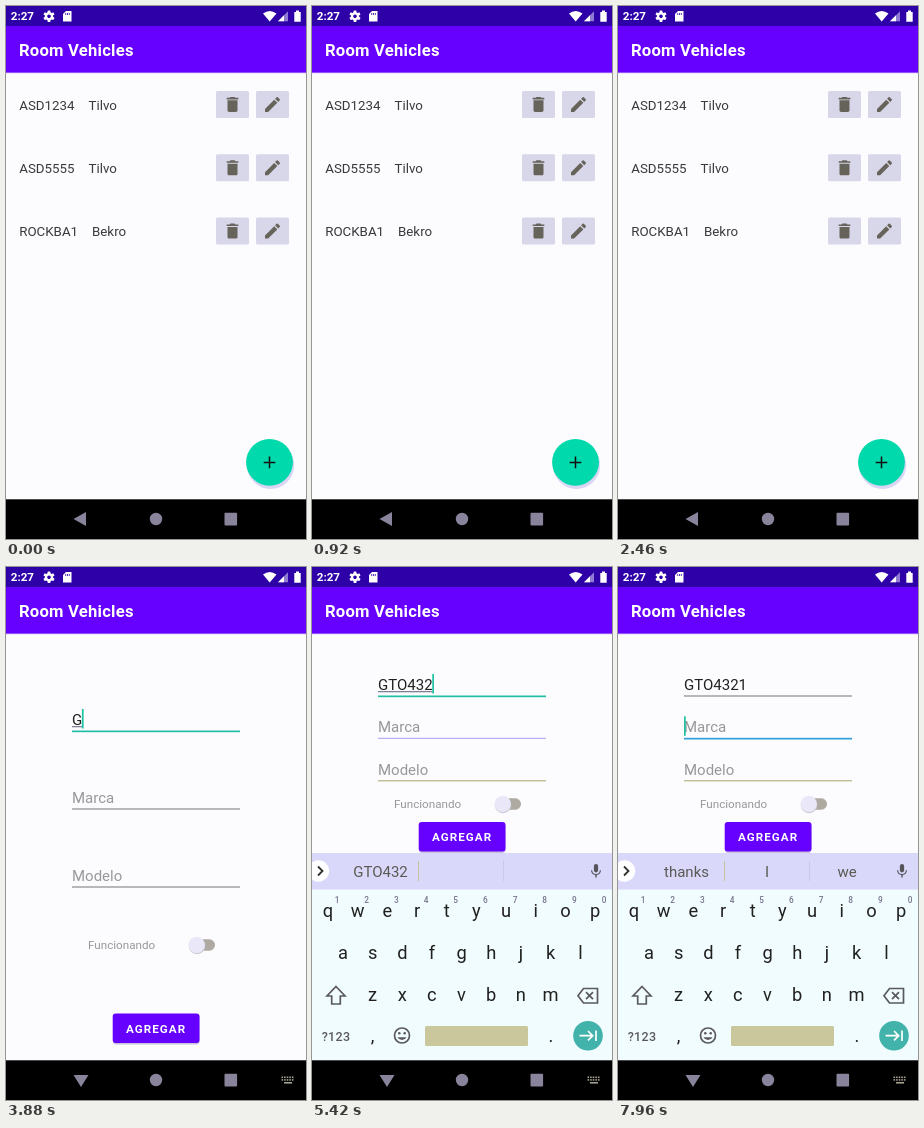
An HTML page for the animation above (8000 ms loop, 300x533 px).

```html
<!DOCTYPE html>
<html lang="es">
<head>
<meta charset="utf-8">
<title>Room Vehicles</title>
<style>
  html, body { margin: 0; width: 100%; height: 100%; overflow: hidden; background: #fcfcff; }
  svg { display: block; width: 100%; height: 100%; }
  text { font-family: Roboto, "Noto Sans", sans-serif; fill: #20201f; white-space: pre; }
  .mid { text-anchor: middle; }
  .row { font-size: 13.33px; fill: #3a3a3a; }
  .field { font-size: 15px; }
  .hint { fill: #98979a; }
  .key { font-size: 18.3px; }
  .word { font-size: 15px; fill: #5a5952; }
  .med { font-weight: 500; }
  .bold { font-weight: 700; fill: #fff; }
  .line { fill: none; stroke: #5a5a5e; stroke-width: 1.7; }
</style>
</head>
<body>
<svg id="stage" viewBox="0 0 300 533"></svg>
<script>
const LOOP = 8000;
const FORM_AT = 3300, FOCUS_AT = 3660, IME_AT = 3740, KEYS_AT = 3900, TAB_AT = 5940;
const typed = [[3840, "G"], [4000, "GT"], [4150, "GTO"], [4750, "GTO4"],
               [5000, "GTO43"], [5220, "GTO432"], [5450, "GTO4321"]];
const words = {
  "": ["thanks", "I", "we"],
  G: ["G", "Good", "Go"],
  GT: ["GT", "GTA", "GET"],
  GTO: ["GTO", "GO", "GOOD"]
};
// Baselines of the fields, centre of the switch, top of the button
const tall = { fields: [158, 236, 314], toggle: 378, button: 446.5 };
const compact = { fields: [123, 165.3, 207.8], toggle: 237, button: 255 };

const rect = (x, y, w, h, fill, extra = "") =>
  `<rect x="${x}" y="${y}" width="${w}" height="${h}" fill="${fill}" ${extra}/>`;
const circle = (x, y, r, fill, extra = "") =>
  `<circle cx="${x}" cy="${y}" r="${r}" fill="${fill}" ${extra}/>`;
const text = (x, y, cls, str, extra = "") =>
  `<text x="${x}" y="${y}" class="${cls}" ${extra}>${str}</text>`;
const path = (d, fill, extra = "") => `<path d="${d}" fill="${fill}" ${extra}/>`;
const group = (id, body, extra = "") => `<g id="${id}" ${extra}>${body}</g>`;
// Icon drawn on a 24 unit grid, centred on x, y
const icon = (x, y, size, d, fill) =>
  path(d, fill, `transform="translate(${x - size / 2} ${y - size / 2}) scale(${size / 24})"`);

const TRASH = "M6 19c0 1.1.9 2 2 2h8c1.1 0 2-.9 2-2V7H6zM19 4h-3.500l-1-1h-5l-1 1H5v2h14z";
const PENCIL = "M3 17.250V21h3.750L17.800 9.940l-3.750-3.750zM20.700 7.040a1 1 0 0 0 0-1.410l-2.340-2.340a1 1 0 0 0-1.410 0l-1.830 1.830 3.750 3.750z";
const MIC = "M12 14a3 3 0 0 0 3-3V5a3 3 0 0 0-6 0v6a3 3 0 0 0 3 3zM17.300 11a5.300 5.300 0 0 1-10.600 0H5a7 7 0 0 0 6 6.700V21h2v-3.300A7 7 0 0 0 19 11z";

function gear(x, y) {
  let teeth = "";
  for (let a = 0; a < 360; a += 60)
    teeth += rect(-1.4, -5.7, 2.8, 3.5, "#fff", `rx=".5" transform="rotate(${a})"`);
  return `<g transform="translate(${x} ${y})">${teeth}
    <circle r="3" fill="none" stroke="#fff" stroke-width="2.400"/></g>`;
}

function bars() {
  return rect(0, 0, 300, 20, "#2e00a8") +
    text(4.7, 14.4, "bold", "2:27", 'style="font-size:11.67px"') +
    gear(43, 10.2) +
    path("M60 5h5.500v10.500h-8.500V8z", "#fff") +
    path("M59.700 7v2M61.500 7v2M63.300 7v2", "none", 'stroke="#2e00a8" stroke-width=".8"') +
    path("M257 7.500Q263.700 2.500 270.500 7.500L263.700 15.500Z", "#fff") +
    path("M272 15.200L282 5.200V15.200Z", "#8f7bd4") +
    path("M272 15.200L278 9.200V15.200Z", "#fff") +
    path("M288.300 6h1.700v-1.400h3v1.400h1.700v9.700h-6.400z", "#fff") +
    rect(0, 20, 300, 46.65, "#6600ff") +
    text(13, 49.7, "bold", "Room Vehicles", 'style="font-size:16.67px;letter-spacing:.0125em"');
}

function list() {
  const rows = [["ASD1234", "Tilvo", 82.5], ["ASD5555", "Tilvo", 82.5], ["ROCKBA1", "Bekro", 86]];
  const body = rows.map(([plate, model, x], i) => {
    const y = 98.5 + i * 63.3;
    return text(13.2, y + 5, "row", plate) + text(x, y + 5, "row", model) +
      [226.5, 266.5].map((cx, k) =>
        rect(cx - 16.5, y - 13.5, 33, 27, "#d8d6e9", 'rx="1.500"') +
        icon(cx, y, 20, k ? PENCIL : TRASH, "#66645a")).join("");
  }).join("");
  return body + group("fab",
    circle(264.5, 459.3, 23.7, "#d8d6f4") + circle(263.5, 456.3, 23.4, "#00d9ab") +
    circle(263.5, 456.3, 0, "#fff", 'id="ripple"') +
    path("M257.700 456.400h11.600M263.500 450.600v11.600", "none", 'stroke="#101010" stroke-width="1.500"'));
}

function form() {
  const hints = ["Placas", "Marca", "Modelo"];
  return rect(0, 67, 300, 426, "#fcfcff") +
    hints.map((h, i) => group("field" + i,
      text(66, 0, "field hint", h) + rect(66, 5.5, 168, 1, "#77777b"))).join("") +
    rect(66, 0, 0, 0.9, "#4c4a70", 'id="compose"') +
    rect(66, 0, 1.7, 19.5, "#1cc3a2", 'id="caret"') +
    group("toggle", text(82, 4.4, "hint", "Funcionando", 'style="font-size:11.67px"') +
      rect(184, -5.7, 25, 11.4, "#aeaaa2", 'rx="5.700"') +
      circle(191, 1, 8.3, "#c9c7cf") + circle(190.7, 0, 8.2, "#eae8f8")) +
    group("button", rect(107, 1.4, 86.5, 29.6, "#c6c1dc", 'rx="3"') +
      rect(106.7, 0, 86.8, 29.6, "#6600ff", 'rx="3"') +
      text(120, 19, "bold", "AGREGAR", 'style="font-size:11.67px;letter-spacing:1.04px"'));
}

function keyboard() {
  const row = (keys, x, y) => [...keys].map((k, i) =>
    text(x + i * 29.67, y, "key mid", k)).join("");
  const digits = [..."1234567890"].map((d, i) =>
    text(25 + i * 29.67, 336, "mid med", d, 'style="font-size:8.3px;fill:#77758c"')).join("");
  return rect(0, 286, 300, 37, "#d9d8fb") + rect(0, 322.5, 300, 171, "#f1fcff") +
    circle(6.5, 304, 10.7, "#fff") +
    path("M6 299.500l4.500 4.500-4.500 4.500", "none", 'stroke="#30302e" stroke-width="1.800"') +
    [68.5, 149, 229].map((x, i) => text(x, 309.5, "word mid", "", `id="word${i}"`)).join("") +
    rect(106, 294, 1, 20, "#c6c49c") + rect(191, 294, 1, 20, "#cac8e6") +
    icon(284, 304, 17, MIC, "#55545a") +
    row("qwertyuiop", 16, 349.5) + digits + row("asdfghjkl", 31, 391.5) + row("zxcvbnm", 60.5, 434) +
    path("M24 419.500l9 9.500h-4.700v8h-8.600v-8H15z", "none", 'class="line"') +
    path("M271.500 421.500h14v14.500h-14l-5.500-7.250z", "none", 'class="line"') +
    path("M274 425.200l7 7m0-7l-7 7", "none", 'class="line"') +
    text(24, 473.5, "mid med", "?123", 'style="font-size:12.5px;fill:#5a5a5e;letter-spacing:.3px"') +
    text(60.5, 474.5, "key mid", ",") + text(239, 474.5, "key mid", ".") +
    circle(90, 468.5, 7.5, "none", 'class="line"') +
    circle(87.3, 466.3, 1.3, "#5a5a5e") + circle(92.7, 466.3, 1.3, "#5a5a5e") +
    path("M85.500 470.200a5 5 0 0 0 9 0z", "#5a5a5e") +
    rect(113, 459, 103, 20, "#c9c79b", 'rx="1.500"') +
    circle(276, 468.7, 14.8, "#42b3aa") +
    path("M267.500 468.700h13M276 464l4.700 4.700-4.700 4.700M284 463.500v10.400", "none", 'stroke="#fff" stroke-width="1.700"');
}

function nav() {
  const c = "#89849c";
  let dots = "";
  for (let i = 0; i < 10; i++)
    dots += rect(275.5 + (i % 5) * 2.6, 509.5 + Math.floor(i / 5) * 2.6, 1.6, 1.6, "#a3a08f");
  return rect(0, 493.3, 300, 40, "#000") +
    path("M67.500 513L80 506v14z", c, 'id="back"') +
    path("M67.500 508h15l-7.500 12z", c, 'id="down"') +
    circle(150, 513, 6.2, c) + rect(218.5, 506.8, 12.6, 12.6, c, 'rx="1"') +
    group("ime", dots + rect(278, 515, 8, 1.6, "#a3a08f"));
}

const stage = document.getElementById("stage");
stage.innerHTML = rect(0, 0, 300, 533, "#fcfcff") + group("list", list()) + group("form", form()) +
  rect(0, 66.5, 300, 1, "#dcd8f2") + bars() + group("keys", keyboard()) + nav() +
  text(66, 0, "field", "", 'id="probe" visibility="hidden"');

const el = {};
stage.querySelectorAll("[id]").forEach(n => el[n.id] = n);
const set = (n, attrs) => { for (const k in attrs) n.setAttribute(k, attrs[k]); };
const show = (n, on) => set(n, { visibility: on ? "visible" : "hidden" });
const move = (n, y) => set(n, { transform: `translate(0 ${y})` });
const ramp = (t, from, ms) => Math.min(1, Math.max(0, (t - from) / ms));
const easeOut = p => 1 - (1 - p) ** 3;

function lineColor(i, active, keysUp) {
  if (i === active) return i ? "#2f9fdc" : "#22bfa3";
  if (!keysUp || !i) return "#77777b";
  return i === 1 ? "#a79eee" : "#a9a568";
}

function render(t) {
  const press = ramp(t, 3170, 180);
  set(el.ripple, { r: 23.3 * easeOut(press), opacity: press > 0 ? 0.28 : 0 });

  const enter = easeOut(ramp(t, FORM_AT, 220));
  set(el.form, { opacity: enter });
  move(el.form, 34 * (1 - enter));

  const keysUp = t >= KEYS_AT;
  const layout = keysUp ? compact : tall;
  const active = t < FOCUS_AT ? -1 : t < TAB_AT ? 0 : 1;
  const last = typed.filter(([at]) => t >= at).pop();
  const value = last ? last[1] : "";
  const composing = value && active === 0;

  layout.fields.forEach((y, i) => {
    const [label, line] = el["field" + i].children;
    move(el["field" + i], y);
    set(line, { fill: lineColor(i, active, keysUp), height: i === active ? 1.7 : 1 });
    if (!i) {
      label.textContent = value || "Placas";
      label.setAttribute("class", value ? "field" : "field hint");
    }
  });
  el.probe.textContent = value;
  const width = value ? el.probe.getComputedTextLength() : 0;
  set(el.compose, { width: composing ? width : 0, y: layout.fields[0] + 1.3 });

  const since = t - Math.max(FOCUS_AT, last ? last[0] : 0, t >= TAB_AT ? TAB_AT : 0);
  show(el.caret, active >= 0 && since % 1000 < 500);
  set(el.caret, {
    x: active ? 66 : 65.7 + width,
    y: layout.fields[Math.max(active, 0)] - 16
  });
  move(el.toggle, layout.toggle);
  move(el.button, layout.button);

  const rise = easeOut(ramp(t, KEYS_AT, 200));
  show(el.keys, keysUp);
  move(el.keys, 207 * (1 - rise));
  const hints = active === 1 ? words[""] : words[value] || [value, "", ""];
  hints.forEach((w, i) => el["word" + i].textContent = w);

  const ime = t >= IME_AT;
  show(el.back, !ime);
  show(el.down, ime);
  show(el.ime, ime);
}

const start = performance.now();
function tick() {
  render((performance.now() - start) % LOOP);
  requestAnimationFrame(tick);
}
tick();
</script>
</body>
</html>
```
